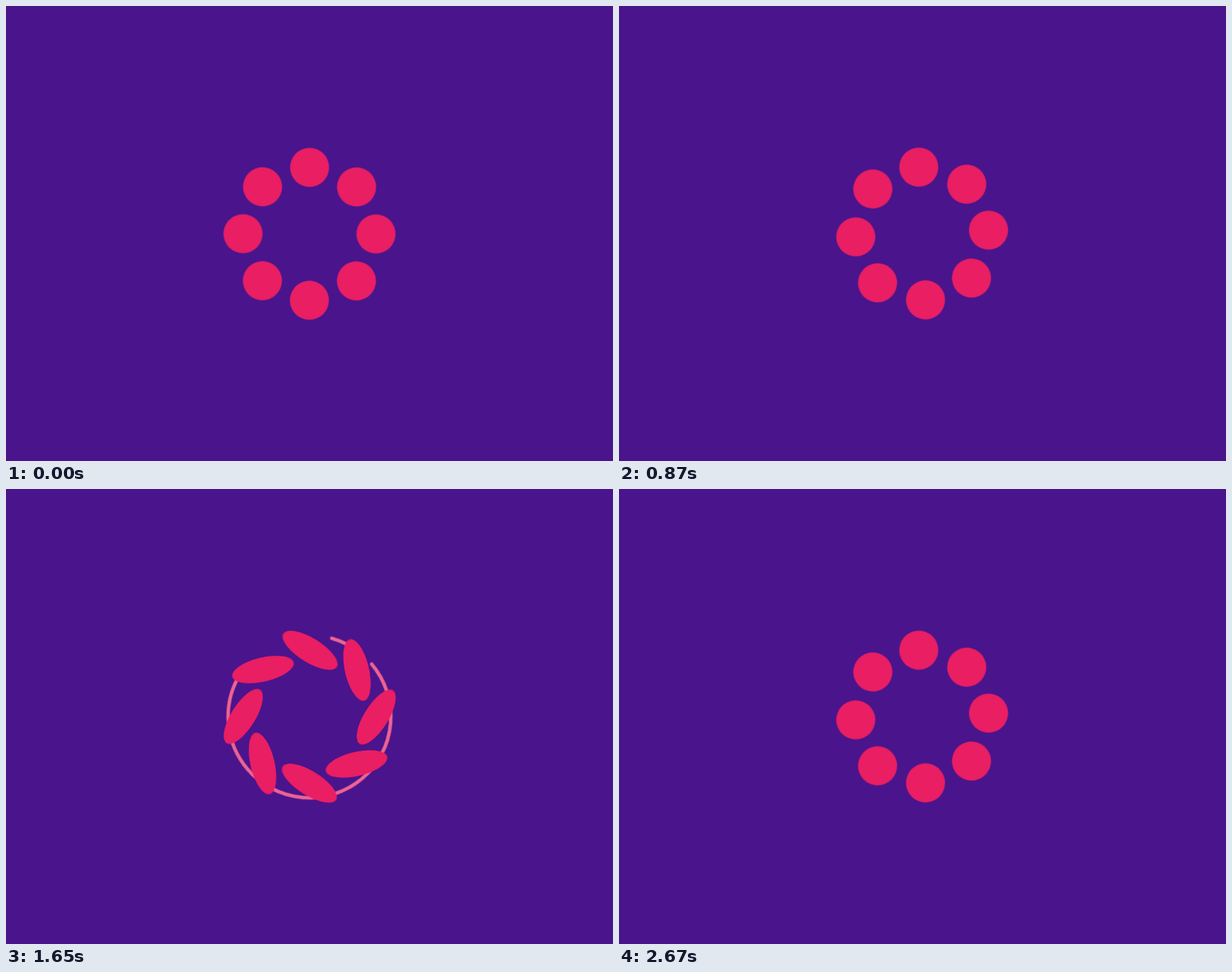
Recreate the animation shown at these times as an HTML page. Size 800 by 600 pixels, loop 2.7 s.

```html
<!DOCTYPE html>
<html lang="en">
<head>
<meta charset="utf-8">
<title>Spinner</title>
<style>
  html, body { margin: 0; width: 100%; height: 100%; overflow: hidden; background: #4a148c; }
  svg { display: block; width: 100vw; height: 100vh; }

  .ring, .arc, .dot { animation: 2.7s linear infinite; }
  .ring, .arc { transform-origin: 400px 300px; }

  .ring { animation-name: spin; }
  .dot { fill: #e91e63; animation-name: lean; }
  .arc {
    fill: none;
    stroke: #f06292;
    stroke-width: 4.6;
    stroke-linecap: round;
    stroke-dasharray: 249 77 23 11;
    animation-name: whirl, show;
  }

  /* slow quarter turn, fast three quarters, slow quarter turn */
  @keyframes spin {
    0% { transform: rotate(0deg); }
    33.3333% { transform: rotate(90deg); }
    66.6667% { transform: rotate(360deg); }
    100% { transform: rotate(450deg); }
  }
  @keyframes lean {
    0%, 33.32% { transform: skewX(0deg); }
    33.33% { transform: skewX(29deg); }
    57.78%, 66.65% { transform: skewX(45deg); }
    66.66%, 100% { transform: skewX(0deg); }
  }
  @keyframes whirl {
    0%, 33.3333% { transform: rotate(350.8deg); }
    66.6667%, 100% { transform: rotate(-549.2deg); }
  }
  @keyframes show {
    0%, 33.32% { opacity: 0; }
    33.33%, 66.65% { opacity: 1; }
    66.66%, 100% { opacity: 0; }
  }
</style>
</head>
<body>
<svg viewBox="0 0 800 600">
  <circle class="arc" cx="400" cy="300" r="107.2" pathLength="360"/>
  <g class="ring" id="ring"></g>
</svg>
<script>
  const dot = i =>
    `<g transform="translate(400 300.45) rotate(${i * 45}) translate(0 -87.6)">
      <circle class="dot" r="25.7"/>
    </g>`;
  document.getElementById('ring').innerHTML = Array.from({ length: 8 }, (_, i) => dot(i)).join('');
</script>
</body>
</html>
```
